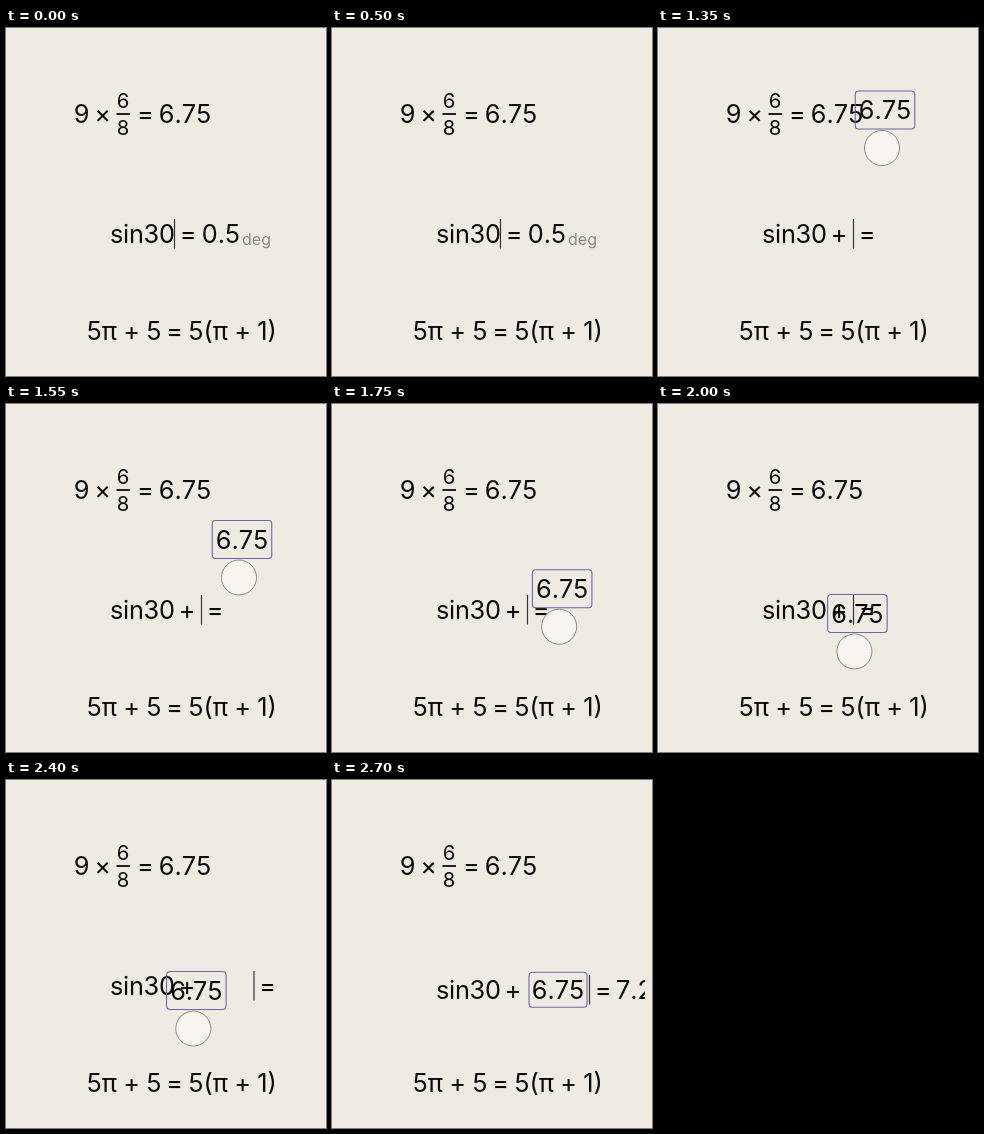
These frames come from a looping animation (320x348 px, 2.75 s). An HTML page:

```html
<!DOCTYPE html>
<html lang="en">
<head>
<meta charset="utf-8">
<title>Drag a result into an equation</title>
<style>
  html, body { margin: 0; height: 100%; overflow: hidden; background: #efebe3; }
  svg { display: block; }
  #stage { width: 100%; height: 100%; }
  text { font: 25.3px Inter, Roboto, sans-serif; font-kerning: none; fill: #0c0c0c; text-anchor: middle; }
  .fraction { font-size: 20.3px; }
  #word { letter-spacing: -.3px; }
  #unit { font-size: 16px; fill: #8b8883; }
  #caret { stroke: #333; stroke-width: 1.2; }
  #frame { fill: none; stroke: #7563a8; stroke-width: 1.1; }
  #touch { fill: #f8f5f0; stroke: #8d8983; stroke-width: 1; }
</style>
</head>
<body>
<svg id="stage" viewBox="0 0 320 348">
  <text x="75.5" y="95.4">9</text>
  <text x="96.7" y="95.4">×</text>
  <text class="fraction" x="117" y="80.2">6</text>
  <path d="M110.5 86H124" stroke="#0c0c0c" stroke-width="1.8"/>
  <text class="fraction" x="117" y="106.5">8</text>
  <text x="139.3" y="95.4">=</text>
  <text x="179" y="95.4">6.75</text>

  <svg width="313" height="348">
    <g id="row">
      <text id="word" x="136.3" y="215.3">sin30</text>
      <text id="plus" x="181" y="215.3">+</text>
      <path id="caret"/>
      <text id="equals" y="215.3">=</text>
      <g id="answer">
        <text x="215" y="215.3">0.5</text>
        <text id="unit" x="250.5" y="216.5">deg</text>
      </g>
      <text id="total" x="284" y="215.3" style="text-anchor:start">7.25</text>
    </g>
  </svg>

  <text x="96" y="312.4">5π</text>
  <text x="125.5" y="312.4">+</text>
  <text x="148" y="312.4">5</text>
  <text x="168.5" y="312.4">=</text>
  <text x="202.3" y="312.4">5(π</text>
  <text x="236.5" y="312.4">+</text>
  <text x="261" y="312.4">1)</text>

  <g id="chip">
    <rect id="frame" rx="3.5"/>
    <text y="9.3">6.75</text>
  </g>
  <circle id="touch" r="17.5"/>
</svg>
<script>
const LOOP = 2750, STEP = 50;
const TYPED = 700, TOUCHED = 1050, LIFTED = 1100, DROPPED = 2550;

// Centre of the dragged chip: time, x, y
const path = [
  [1100, 180, 48], [1350, 227, 82], [1550, 236, 135.5],
  [1720, 233, 180], [2000, 199.4, 209.5], [2400, 190.3, 210.5], [2550, 193, 210.5]
];

const $ = id => document.getElementById(id);
const show = (id, on) => $(id).setAttribute('visibility', on ? 'visible' : 'hidden');
const set = (id, attrs) => {
  for (const name in attrs) $(id).setAttribute(name, attrs[name]);
};
const smooth = (t, from, to) => {
  const p = Math.min(1, Math.max(0, (t - from) / (to - from)));
  return p * p * (3 - 2 * p);
};

function slope(i, axis) {
  const a = path[Math.max(0, i - 1)], b = path[Math.min(path.length - 1, i + 1)];
  return i === 0 ? 0 : (b[axis] - a[axis]) / (b[0] - a[0]);
}

// Cubic Hermite curve through the path points
function along(t, axis) {
  t = Math.min(path.at(-1)[0], Math.max(path[0][0], t));
  let i = 0;
  while (i < path.length - 2 && t > path[i + 1][0]) i++;
  const a = path[i], b = path[i + 1], span = b[0] - a[0];
  const p = (t - a[0]) / span, q = 1 - p;
  return q * q * (1 + 2 * p) * a[axis] + p * p * (3 - 2 * p) * b[axis]
    + span * p * q * (q * slope(i, axis) - p * slope(i + 1, axis));
}

function draw(t) {
  const typed = t >= TYPED, dropped = t >= DROPPED;
  const gap = 52.5 * smooth(t, 2050, 2250);
  const caret = dropped ? 257.5 : typed ? 195.5 + gap : 168.5;
  const equals = dropped ? 271 : typed ? 209 + gap : 182;

  set('row', { transform: `translate(0 ${dropped ? 4 : 0})` });
  set('caret', { d: `M${caret} 191V220.5` });
  set('equals', { x: equals });
  show('plus', typed);
  show('answer', !typed);
  show('total', dropped);

  const x = dropped ? 226 : along(t, 1), y = dropped ? 209.7 : along(t, 2);
  const width = dropped ? 58 : 59.5, height = dropped ? 35 : 38;
  set('chip', { transform: `translate(${x} ${y})` });
  set('frame', { x: -width / 2, y: -height / 2, width, height });
  show('chip', t >= LIFTED);

  set('touch', { cx: x - 3, cy: y + 38 });
  show('touch', t >= TOUCHED && !dropped);
}

function tick(now) {
  draw(Math.floor((now % LOOP) / STEP) * STEP);
  requestAnimationFrame(tick);
}
draw(0);
requestAnimationFrame(tick);
</script>
</body>
</html>
```
